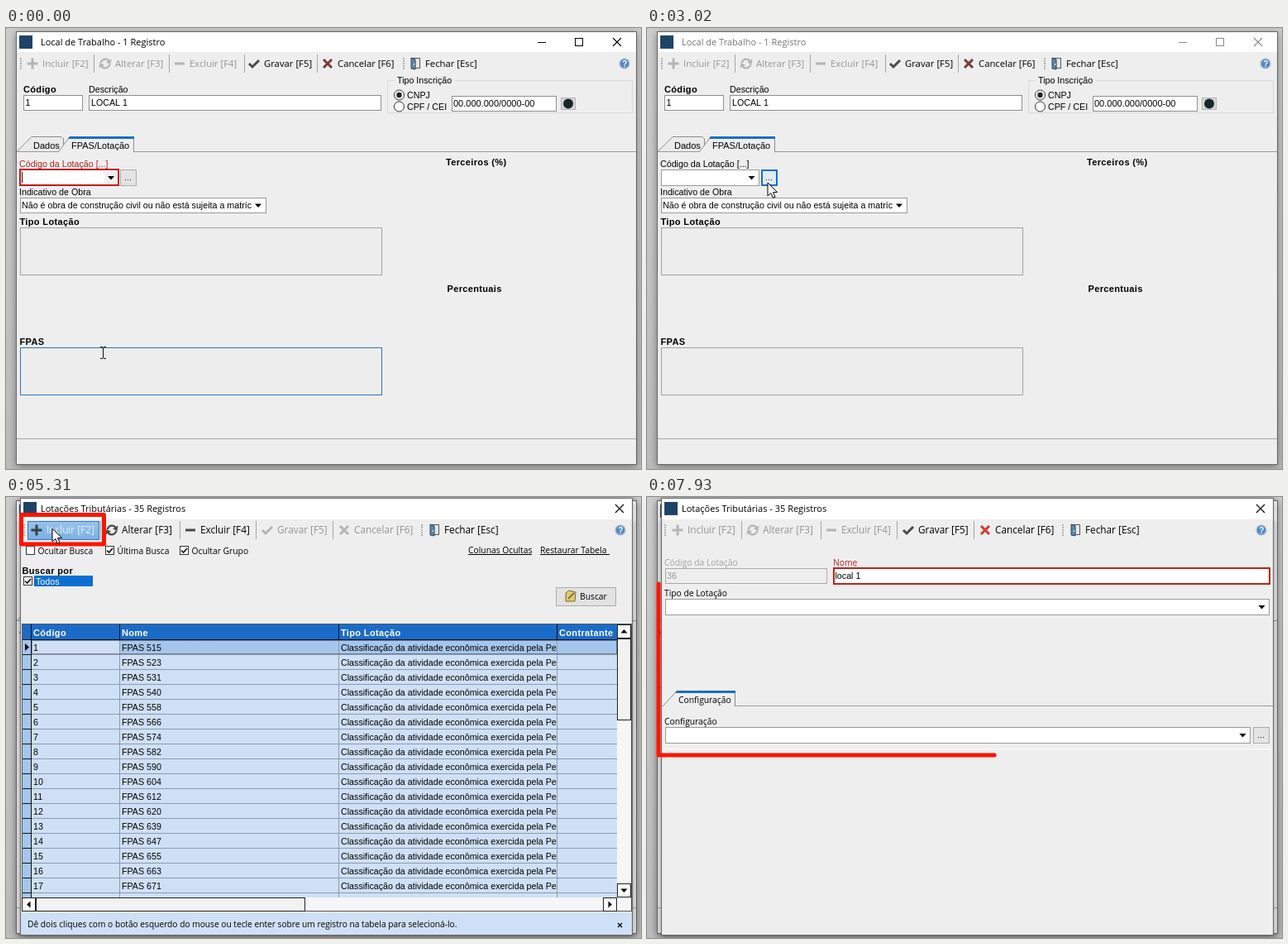
Recreate the animation shown at these times as an HTML page with a canvas. Size 768 px wide and 533 px high, loop 8000 ms.

```html
<!DOCTYPE html>
<html lang="pt-BR">
<head>
<meta charset="utf-8">
<title>Local de Trabalho</title>
<style>
html, body { margin: 0; width: 100%; height: 100%; overflow: hidden; background: #c3c3c3; }
canvas { display: block; }
</style>
</head>
<body>
<canvas id="stage" width="768" height="533"></canvas>
<script>
const ctx = document.getElementById('stage').getContext('2d');
const LOOP = 8000;
const SANS = '10.7px "Liberation Sans", Arial, sans-serif';
const BOLD = 'bold 11px "Liberation Sans", Arial, sans-serif';
const UI = '10.3px "Open Sans", "Noto Sans", sans-serif';
const HINT = '10.2px "Open Sans", "Noto Sans", sans-serif';
const TITLE = '11px "Open Sans", "Noto Sans", sans-serif';
const FACE = '#efeeee', INK = '#000', RED = '#ff1400', ERR = '#b52020', BLUE = '#1b6ec2';
const ROW = '#cfe0f6', PICKED = '#a5c6ec';
const CODES = [515, 523, 531, 540, 558, 566, 574, 582, 590, 604, 612, 620, 639, 647, 655, 663, 671, 680];

const clamp = v => Math.max(0, Math.min(1, v));
const part = (t, a, b) => clamp((t - a) / (b - a));
const ease = u => u * u * (3 - 2 * u);
const mix = (a, b, u) => a + (b - a) * u;

function fill(x, y, w, h, c) { ctx.fillStyle = c; ctx.fillRect(x, y, w, h); }

function box(x, y, w, h, bg, line, lw = 1) {
  if (bg) fill(x, y, w, h, bg);
  ctx.strokeStyle = line;
  ctx.lineWidth = lw;
  ctx.strokeRect(x + lw / 2, y + lw / 2, w - lw, h - lw);
}

function path(pts, line, lw = 1, bg, close) {
  ctx.beginPath();
  pts.forEach(([x, y]) => ctx.lineTo(x, y));
  if (close) ctx.closePath();
  if (bg) { ctx.fillStyle = bg; ctx.fill(); }
  if (line) { ctx.strokeStyle = line; ctx.lineWidth = lw; ctx.stroke(); }
}

function disc(x, y, r, bg, line, lw = 1) {
  ctx.beginPath();
  ctx.arc(x, y, r, 0, 7);
  if (bg) { ctx.fillStyle = bg; ctx.fill(); }
  if (line) { ctx.strokeStyle = line; ctx.lineWidth = lw; ctx.stroke(); }
}

function text(s, x, y, font = SANS, c = INK) {
  ctx.font = font;
  ctx.letterSpacing = font === BOLD ? '0.35px' : '0px';
  ctx.fillStyle = c;
  ctx.fillText(s, x, y);
}

function clipped(x, y, w, h, draw) {
  ctx.save();
  ctx.beginPath();
  ctx.rect(x, y, w, h);
  ctx.clip();
  draw();
  ctx.restore();
}

function faded(alpha, draw) {
  if (alpha <= 0) return;
  ctx.save();
  ctx.globalAlpha = alpha;
  draw();
  ctx.restore();
}

// Triangle pointing along dir: 0 down, 1 left, 2 up, 3 right
function arrow(x, y, dir = 0) {
  ctx.save();
  ctx.translate(x, y);
  ctx.rotate(dir * Math.PI / 2);
  path([[-4, -2], [4, -2], [0, 2.4]], null, 1, '#000', true);
  ctx.restore();
}

function combo(x, y, w) {
  box(x, y, w, 20, '#fff', '#9a9a9a');
  arrow(x + w - 9.5, y + 10);
}

function dots(x, y, line = '#adadad', bg = '#e3e3e3', lw = 1) {
  box(x, y, 20, 20, bg, line, lw);
  for (let i = 0; i < 3; i++) fill(x + 6 + i * 3, y + 12, 1, 1, '#222');
}

const icons = {
  plus(c) { fill(-6.5, -1.5, 13, 3, c); fill(-1.5, -6.5, 3, 13, c); },
  minus(c) { fill(-6, -1.5, 12, 3, c); },
  turn(c) {
    ctx.strokeStyle = c;
    ctx.lineWidth = 2.4;
    for (const s of [1, -1]) {
      ctx.beginPath();
      ctx.arc(0, 0, 5.4, s > 0 ? 3.3 : .16, s > 0 ? 5.7 : 2.6);
      ctx.stroke();
      path([[s * 7.5, -s * 5.5], [s * 6.5, s], [s * 1, -s * 1.5]], null, 1, c, true);
    }
  },
  check(c) { path([[-6, 0], [-2, 4], [6, -4]], c, 3); },
  cross(c) { path([[-5, -5], [5, 5]], c, 3); path([[5, -5], [-5, 5]], c, 3); },
  door(c) {
    box(-5, -7, 11, 13, '#dfe6ec', '#555');
    path([[-5, -7], [0, -5], [0, 7], [-5, 6]], '#345', 1, '#5b88a8', true);
    fill(-2, 0, 1, 2, '#fff');
  }
};

function icon(name, x, y, c) {
  ctx.save();
  ctx.translate(x, y);
  icons[name](c);
  ctx.restore();
}

function help(x, y) {
  disc(x, y, 6, '#5288c4', '#b4c3d2', 1.5);
  text('?', x - 2.7, y + 4, 'bold 10px "Liberation Sans", sans-serif', '#fff');
}

// Items: icon, label, icon x, label x
function toolbar(items, y, size, on, lines, grips, helpX) {
  const font = size + 'px "Open Sans", "Noto Sans", sans-serif';
  items.forEach(([name, label, ix, tx], i) => {
    const active = on[i];
    const c = !active ? '#b5b5b5' : name === 'cross' ? (size > 11.5 ? '#d03c30' : '#7c3b36') : '#4a4a48';
    icon(name, ix, y, c);
    text(label, tx, y + 4, font, active ? INK : '#959595');
  });
  lines.forEach(x => fill(x, y - 11, 1, 22, '#a6a6a6'));
  grips.forEach(x => { for (let i = -7; i < 8; i += 3) fill(x, y + i, 2, 2, '#b2b2b2'); });
  help(helpX, y);
}

function frame(x, y, w, h, titleH, title, titleX, c) {
  ctx.save();
  ctx.shadowColor = 'rgba(0,0,0,.4)';
  ctx.shadowBlur = 9;
  ctx.shadowOffsetY = 2;
  fill(x, y, w, h, FACE);
  ctx.restore();
  box(x, y, w, h, FACE, '#686868');
  fill(x + 1, y + 1, w - 2, titleH, '#fff');
  fill(x + 4, y + 5, 16, 16, '#1d4468');
  text(title, titleX, y + 16.5, TITLE, c);
}

function closeMark(x, y, c) {
  path([[x - 5, y - 5], [x + 5, y + 5]], c, 1.1);
  path([[x + 5, y - 5], [x - 5, y + 5]], c, 1.1);
}

function tab(x, y, slant, right, h) {
  path([[x, y + h], [x + slant, y + .5], [right, y + .5], [right, y + h]], '#8d8d8d', 1, FACE);
  path([[x + slant - 2, y + 3], [x + slant, y], [right + .5, y], [right + .5, y + 3]], null, 1, BLUE, true);
}

const NAMES = [['plus', 'Incluir [F2]'], ['turn', 'Alterar [F3]'], ['minus', 'Excluir [F4]'],
  ['check', 'Gravar [F5]'], ['cross', 'Cancelar [F6]'], ['door', 'Fechar [Esc]']];
const withX = (ix, tx) => NAMES.map((n, i) => [...n, ix[i], tx[i]]);
const BAR_A = withX([32, 120, 210, 300, 389, 495], [44, 132, 222, 312, 401, 507]);
const BAR_B = withX([37, 128, 223, 316, 409, 518], [49, 140, 235, 328, 421, 530]);

function workplace(t) {
  const idle = t >= 2960;
  const tone = idle ? '#8a8a8a' : INK;
  frame(12, 4, 751, 524, 24, 'Local de Trabalho - 1 Registro', 42, idle ? '#777' : INK);
  fill(643, 17, 10, 1, tone);
  box(688, 12, 10, 10, null, tone);
  closeMark(739, 17, tone);
  toolbar(BAR_A, 43, 11.3, [0, 0, 0, 1, 1, 1], [106, 197, 288, 376], [17, 480], 748);

  text('Código', 21, 78, BOLD);
  box(21, 81, 72, 19, '#fff', '#8f8f8f');
  text('1', 23.5, 94);
  text('Descrição', 100, 78);
  box(100, 81, 354, 19, '#fff', '#8f8f8f');
  text('LOCAL 1', 103, 94);
  box(461, 63, 297, 40, null, '#dadada');
  fill(470, 60, 73, 8, FACE);
  text('Tipo Inscrição', 473, 67);
  for (const y of [81, 95]) disc(475.5, y, 6, '#fff', '#333');
  disc(475.5, 81, 3.2, '#222');
  text('CNPJ', 485, 85);
  text('CPF / CEI', 485, 99);
  box(539, 82, 127, 19, '#fff', '#8f8f8f');
  text('00.000.000/0000-00', 541, 95, '11px "Liberation Sans", Arial, sans-serif');
  box(671, 84, 18, 15, '#d3d8d8', '#b5b5b5');
  disc(680, 91.5, 6, '#17282c');

  path([[13, 149.5], [31, 131.5], [67, 131.5], [69.5, 134], [69.5, 149.5]], '#8d8d8d', 1, '#ebebeb');
  fill(13, 149, 749, 1, '#9a9a9a');
  tab(63, 131, 14, 154.5, 19);
  fill(65, 149, 89, 1, FACE);
  text('Dados', 33, 145.5, '11px "Liberation Sans", Arial, sans-serif');
  text('FPAS/Lotação', 79, 145.5, '11px "Liberation Sans", Arial, sans-serif');

  text('Código da Lotação [...]', 16, 168, SANS, idle ? INK : ERR);
  if (idle) combo(17, 171, 119);
  else {
    box(16, 170, 121, 21, '#fff', '#c01a1a', 2);
    fill(119, 173, 15, 15, '#f1f1f1');
    arrow(127, 181);
    fill(19, 174, 1, 13, '#111');
  }
  if (idle) dots(138, 171, BLUE, '#dfebf6', 2);
  else if (t > 780) dots(138, 171, BLUE, '#dcebf8');
  else dots(138, 171);
  text('Indicativo de Obra', 16, 202);
  box(17, 205, 298, 19, '#fff', '#9a9a9a');
  text('Não é obra de construção civil ou não está sujeita a matríc', 19, 218);
  arrow(305, 214.5);
  text('Tipo Lotação', 16.5, 238, BOLD);
  box(17, 241, 438, 58, '#ededed', '#a2a2a2');
  text('FPAS', 16.5, 383, BOLD);
  box(17, 386, 438, 58, '#ededed', t < 200 ? '#2877bd' : '#a2a2a2');
  text('Terceiros (%)', 532, 166, BOLD);
  text('Percentuais', 533.5, 319, BOLD);
  fill(13, 496, 749, 1, '#a8a8a8');
}

function tick(x, y, s, on) {
  box(x, y, s, s, '#fff', '#333');
  if (on) path([[x + 2, y + s / 2], [x + s * .42, y + s - 3], [x + s - 2, y + 3]], '#111', 1.7);
}

function link(s, x, w) {
  text(s, x, 68, UI);
  fill(x, 69, w, 1, INK);
}

function scrollButton(x, y, dir) {
  box(x, y, 17, 17, '#fafafa', '#222');
  arrow(x + 8.5, y + 8.5, dir);
}

function grid() {
  fill(19, 153, 738, 348, '#f6f6f6');
  fill(19, 153, 720, 331, ROW);
  fill(19, 154, 720, 18, '#1a6bc9');
  text('Código', 33, 168, BOLD, '#fff');
  text('Nome', 140, 168, BOLD, '#fff');
  text('Tipo Lotação', 405, 168, BOLD, '#fff');
  text('Contratante', 669, 168, BOLD, '#fff');
  clipped(19, 173, 720, 311, () => {
    fill(138, 173, 601, 17, PICKED);
    fill(19, 173, 11, 311, PICKED);
    CODES.forEach((code, i) => {
      const y = 173 + i * 18;
      fill(31, y + 17, 708, 1, '#8d9bac');
      fill(19, y + 17, 12, 1, '#111');
      text(i + 1, 33, y + 13);
      text('FPAS ' + code, 140, y + 13);
      text('Classificação da atividade econômica exercida pela Pe', 405, y + 13);
    });
  });
  for (const x of [137, 402, 666]) {
    fill(x, 154, 1, 19, '#111');
    fill(x, 173, 1, 311, '#8d9bac');
  }
  fill(30, 154, 1, 330, '#111');
  fill(19, 172, 720, 1, '#111');
  ctx.setLineDash([1, 1]);
  box(31, 173, 708, 17, null, '#333');
  ctx.setLineDash([]);
  path([[23, 177], [28, 181.5], [23, 186]], null, 1, '#000', true);
  box(19, 153, 738, 348, null, '#555');

  scrollButton(739, 154, 2);
  box(739, 171, 17, 99, '#f2f2f2', '#222');
  scrollButton(739, 467, 0);
  scrollButton(19, 484, 1);
  box(36, 484, 326, 17, '#f2f2f2', '#222');
  scrollButton(722, 484, 3);
}

function list(t) {
  toolbar(BAR_B, 40, 11.8, [1, 1, 1, 0, 0, 1], [114, 210, 302, 395], [21, 502], 743);
  if (t > 4500) {
    const g = ctx.createLinearGradient(0, 29, 0, 52);
    g.addColorStop(0, '#97c3ec');
    g.addColorStop(1, '#7ab0e1');
    box(26, 29, 87, 23, g, '#2d79bd');
    icon('plus', 37, 40, '#3a4148');
    text('Incluir [F2]', 49, 44, '11.8px "Open Sans", "Noto Sans", sans-serif', '#eef4fa');
  }
  [['Ocultar Busca', 24], ['Última Busca', 120], ['Ocultar Grupo', 210]].forEach(([s, x], i) => {
    tick(x, 59, 11, i);
    text(s, x + 14.5, 69, UI);
  });
  link('Colunas Ocultas', 559, 77);
  link('Restaurar Tabela', 646, 84);
  text('Buscar por', 19.5, 93, BOLD);
  tick(21, 96, 11, true);
  fill(34, 95, 71, 13, '#0a6fd0');
  text('Todos', 36, 105.5, SANS, '#fff');
  box(665, 109, 73, 23, '#e2e2e2', '#adadad');
  path([[677, 116], [681, 113], [689, 115], [688, 126], [677, 126]], '#7a6a35', 1, '#e4c869', true);
  path([[680, 123], [687, 116]], '#555', 1.5);
  text('Buscar', 694, 124, UI);
  grid();
  fill(18, 502, 739, 27, ROW);
  text('Dê dois cliques com o botão esquerdo do mouse ou tecle enter sobre um registro na tabela para selecioná-lo.', 26, 520, HINT);
  path([[740, 515], [745, 520]], '#111', 1.5);
  path([[745, 515], [740, 520]], '#111', 1.5);
}

function form(t) {
  toolbar(BAR_B, 40, 11.8, [0, 0, 0, 1, 1, 1], [114, 210, 302, 395], [21, 502], 743);
  text('Código da Lotação', 21, 83, UI, '#a3a3a3');
  box(22, 86, 196, 19, FACE, '#a9a9a9');
  text('36', 24, 99, SANS, '#999');
  text('Nome', 225, 83, UI, ERR);
  box(225, 85, 529, 21, '#fff', '#c4201a', 2);
  const typed = 'local 1'.slice(0, Math.floor(part(t, 6650, 7320) * 7));
  text(typed, 227.5, 99);
  if (t < 7390) fill(Math.round(228 + ctx.measureText(typed).width), 89, 1, 13, '#111');
  text('Tipo de Lotação', 21, 120, UI);
  combo(22, 123, 731);
  fill(18, 252, 739, 1, '#9a9a9a');
  tab(19, 234, 17, 106.5, 19);
  fill(20, 252, 86, 1, FACE);
  text('Configuração', 38, 249, UI);
  text('Configuração', 21, 275, UI);
  combo(22, 278, 708);
  dots(733, 278);
  fill(18, 304, 739, 1, '#fbfbfb');
}

// Outline drawn from the top left corner: down, right, up, left
function outline(x0, y0, x1, y1, u) {
  if (u <= 0) return;
  const w = x1 - x0, h = y1 - y0;
  ctx.save();
  ctx.beginPath();
  ctx.moveTo(x0, y0);
  ctx.lineTo(x0, y1);
  ctx.lineTo(x1, y1);
  ctx.lineTo(x1, y0);
  ctx.closePath();
  if (u < 1) ctx.setLineDash([2 * (w + h) * u, 1e4]);
  ctx.lineCap = ctx.lineJoin = 'round';
  ctx.strokeStyle = RED;
  ctx.lineWidth = 5;
  ctx.stroke();
  ctx.restore();
}

// Rectangle, draw start and end, fade start and end
const MARKS = [
  [[133.5, 166.5, 161.5, 194.5], 1280, 2015, 2680, 2920],
  [[18.5, 21.5, 118.5, 57], 4420, 5290, 5800, 6020],
  [[220, 71, 762, 115], 6280, 7230, 7240, 7390],
  [[14, 105, 760, 312], 7590, 8650, 9000, 9100]
];

function pointer(x, y) {
  const shape = [[0, 0], [0, 16], [3.8, 12.5], [6.4, 18.3], [9, 17.2], [6.5, 11.6], [11.5, 11.4]];
  path(shape.map(([a, b]) => [x + a, y + b]), '#000', 1, '#fff', true);
}

function beam(x, y) {
  fill(x, y - 6, 1, 13, '#111');
  for (const d of [-7, 7]) { fill(x - 3, y + d, 3, 1, '#111'); fill(x + 1, y + d, 3, 1, '#111'); }
}

// Start time, end time, from, to
const MOVES = [
  [30, 860, [117, 392], [148, 190]],
  [870, 1050, [148, 190], [145, 185]],
  [2370, 2480, [145, 185], [146, 187]],
  [4090, 4620, [146, 187], [56, 38]],
  [6050, 6500, [56, 38], [251, 96]]
];

function cursor(t) {
  if (t > 6680) return;
  let [x, y] = MOVES[0][2];
  for (const [a, b, p, q] of MOVES) {
    if (t < a) break;
    const u = ease(part(t, a, b));
    x = mix(p[0], q[0], u);
    y = mix(p[1], q[1], u);
  }
  const inField = t < 800 ? y > 386 : t > 6100 && x > 226 && y > 86;
  (inField ? beam : pointer)(Math.round(x), Math.round(y));
}

function backdrop() {
  const g = ctx.createLinearGradient(0, 0, 0, 533);
  g.addColorStop(0, '#cdcdcd');
  g.addColorStop(1, '#bcbcbc');
  fill(0, 0, 768, 533, g);
}

function draw(t) {
  backdrop();
  workplace(t);
  faded(part(t, 3080, 3260), () => {
    frame(17, 1, 741, 529, 25, 'Lotações Tributárias - 35 Registros', 42, INK);
    closeMark(742, 14, INK);
    (t < 6120 ? list : form)(t);
  });
  for (const [r, a, b, c, d] of MARKS) faded(1 - part(t, c, d), () => outline(...r, part(t, a, b)));
  cursor(t);
}

function loop() {
  draw(performance.now() % LOOP);
  requestAnimationFrame(loop);
}
loop();
</script>
</body>
</html>
```
